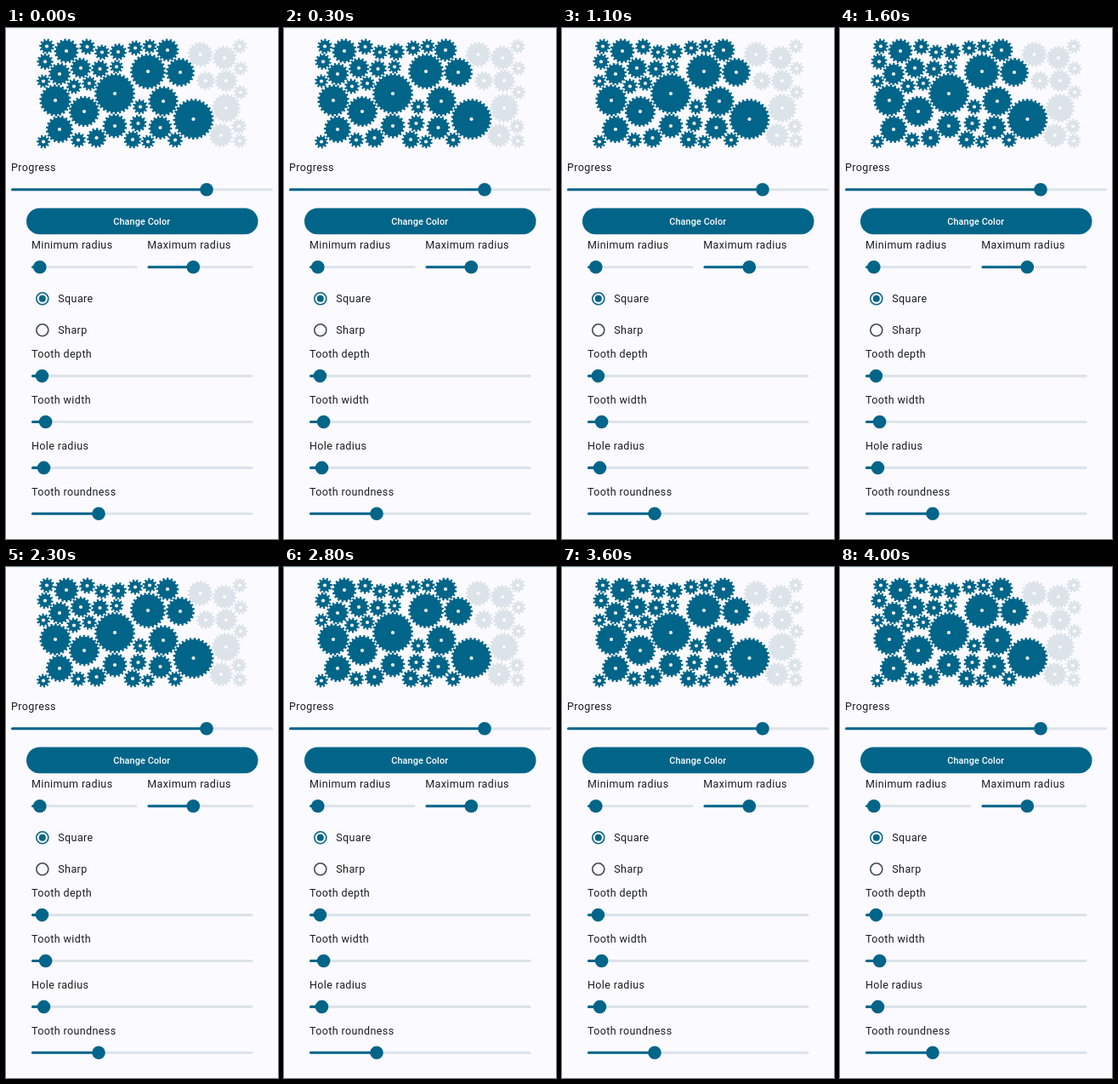
An HTML page with a canvas for the animation above (4.1 s loop, 320x600 px).

```html
<!DOCTYPE html>
<html lang="en">
<head>
<meta charset="utf-8">
<title>Gear progress</title>
<style>
html, body { margin: 0; width: 100%; height: 100%; overflow: hidden; background: #fbfaff; }
canvas { display: block; width: 320px; height: 600px; }
</style>
</head>
<body>
<canvas id="stage"></canvas>
<script>
const BLUE = '#006589', TRACK = '#dce3e9', PAPER = '#fbfaff', INK = '#1a1c1e';
const LOOP = 4100, STEP = 100, TEETH_PER_LOOP = 4, TOOTH = 2.2, TAU = Math.PI * 2;
const BOX = { left: 36, top: 12.5, right: 284.5, bottom: 141.5 };
const MESH = 0.5, LARGEST = 24, SMALLEST = 7.2, FILLER = 9;

const canvas = document.getElementById('stage');
const ctx = canvas.getContext('2d');
const ratio = window.devicePixelRatio || 1;
canvas.width = 320 * ratio;
canvas.height = 600 * ratio;
ctx.scale(ratio, ratio);

// Centres of the main gears, in the order in which they grow.
const anchors = [
  [128, 77], [220.5, 107], [92, 98], [185, 86], [71, 27], [58, 85], [63, 119], [128, 115],
  [190, 26], [205, 52], [167, 51], [228.5, 31], [257, 35], [259, 62], [235, 62], [259, 94],
  [253, 126], [181.5, 117], [63, 54], [95.5, 22], [88, 47], [98, 65], [130, 45.5], [132, 28],
  [110.5, 48], [46, 39.5], [106.5, 129], [149, 131], [155.5, 112]
];
const gears = [];

// Radius a gear at (x, y) can reach before it meets a neighbour or the box.
function clearance(x, y) {
  let room = Math.min(x - BOX.left, BOX.right - x, y - BOX.top, BOX.bottom - y);
  for (const g of gears) {
    if (room < SMALLEST) break;
    room = Math.min(room, Math.sqrt((x - g.x) ** 2 + (y - g.y) ** 2) - g.r + MESH);
  }
  return room;
}

function addGear(x, y, limit) {
  const r = Math.min(limit, clearance(x, y));
  gears.push({ x, y, r, n: Math.round(r * 1.2) });
}

// Put small gears into the widest remaining gaps, outside the column of large gears.
function fillGaps() {
  for (;;) {
    let best = { room: SMALLEST };
    for (let y = BOX.top; y < BOX.bottom; y++) {
      for (let x = BOX.left; x < BOX.right; x++) {
        if (Math.abs(x - 235) < 28) continue;
        const room = clearance(x, y);
        if (room > best.room) best = { room, x, y };
      }
    }
    if (best.x === undefined) return;
    addGear(best.x, best.y, FILLER);
  }
}

// Grow a tree over the tightest contacts so that neighbours mesh and counter-rotate.
function meshGears() {
  const done = [gears[0]], rest = gears.slice(1);
  Object.assign(gears[0], { dir: 1, phase: 0 });
  while (rest.length) {
    let best = { gap: Infinity };
    for (const p of done) for (const c of rest) {
      const gap = Math.hypot(c.x - p.x, c.y - p.y) - p.r - c.r;
      if (gap < best.gap) best = { gap, p, c };
    }
    const { p, c } = best;
    const angle = Math.atan2(c.y - p.y, c.x - p.x);
    const pitch = (angle - p.phase) * p.n / TAU;
    c.dir = -p.dir;
    c.phase = angle + Math.PI - (0.5 - pitch) * TAU / c.n;
    done.push(c);
    rest.splice(rest.indexOf(c), 1);
  }
}

function disc(x, y, r, color) {
  ctx.fillStyle = color;
  ctx.beginPath();
  ctx.arc(x, y, r, 0, TAU);
  ctx.fill();
}

function drawGear(g, progress) {
  const turn = g.phase + g.dir * progress * TEETH_PER_LOOP * TAU / g.n;
  const corners = [[-0.28, g.r - TOOTH], [-0.2, g.r], [0.2, g.r], [0.28, g.r - TOOTH]];
  ctx.beginPath();
  for (let i = 0; i < g.n; i++) {
    for (const [offset, radius] of corners) {
      const a = turn + (i + offset) * TAU / g.n;
      ctx.lineTo(g.x + radius * Math.cos(a), g.y + radius * Math.sin(a));
    }
  }
  ctx.closePath();
  ctx.fillStyle = g.x < 225 ? BLUE : TRACK;
  ctx.fill();
  disc(g.x, g.y, 2.1, PAPER);
}

function line(x1, x2, y, color) {
  ctx.strokeStyle = color;
  ctx.lineWidth = 3.1;
  ctx.lineCap = 'round';
  ctx.beginPath();
  ctx.moveTo(x1 + 1.5, y);
  ctx.lineTo(x2 - 1.5, y);
  ctx.stroke();
}

function slider(x1, x2, y, thumb) {
  line(x1, x2, y, TRACK);
  line(x1, thumb, y, BLUE);
  disc(thumb, y, 7.8, BLUE);
}

function label(text, x, y) {
  ctx.font = '12.5px Roboto, sans-serif';
  ctx.letterSpacing = '0.39px';
  ctx.textAlign = 'left';
  ctx.fillStyle = INK;
  ctx.fillText(text, x, y);
}

function radio(text, y, selected) {
  ctx.strokeStyle = selected ? BLUE : '#42474e';
  ctx.lineWidth = 1.6;
  ctx.beginPath();
  ctx.arc(42.8, y, 7, 0, TAU);
  ctx.stroke();
  if (selected) disc(42.8, y, 4, BLUE);
  label(text, 61.3, y + 4.3);
}

function button() {
  ctx.fillStyle = BLUE;
  ctx.beginPath();
  ctx.roundRect(24, 211.5, 272.5, 30.8, 15.4);
  ctx.fill();
  ctx.font = '500 10.9px Roboto, sans-serif';
  ctx.letterSpacing = '0.08px';
  ctx.textAlign = 'center';
  ctx.fillStyle = '#fff';
  ctx.fillText('Change Color', 159.7, 231);
}

function draw(progress) {
  ctx.fillStyle = PAPER;
  ctx.fillRect(0, 0, 320, 600);
  ctx.fillStyle = '#e0f5fb';
  ctx.fillRect(0, 0, 320, 1);
  gears.forEach(g => drawGear(g, progress));

  label('Progress', 6, 168);
  slider(6, 314, 189.8, 236);
  button();
  label('Minimum radius', 30, 259);
  slider(30, 154.5, 280.7, 39.8);
  label('Maximum radius', 166.2, 259);
  slider(166.5, 290.5, 280.7, 220.3);
  radio('Square', 317.8, true);
  radio('Sharp', 354.8, false);

  const settings = [['Tooth depth', 42.4], ['Tooth width', 46.6], ['Hole radius', 44.5], ['Tooth roundness', 109]];
  settings.forEach(([text, thumb], i) => {
    label(text, 30, 387 + i * 53.9);
    slider(30, 290.5, 408.6 + i * 53.9, thumb);
  });
}

anchors.forEach(([x, y]) => addGear(x, y, LARGEST));
fillGaps();
meshGears();

const start = performance.now();
function tick() {
  const time = (performance.now() - start) % LOOP;
  draw(Math.floor(time / STEP) * STEP / LOOP);
  requestAnimationFrame(tick);
}
tick();
</script>
</body>
</html>
```
